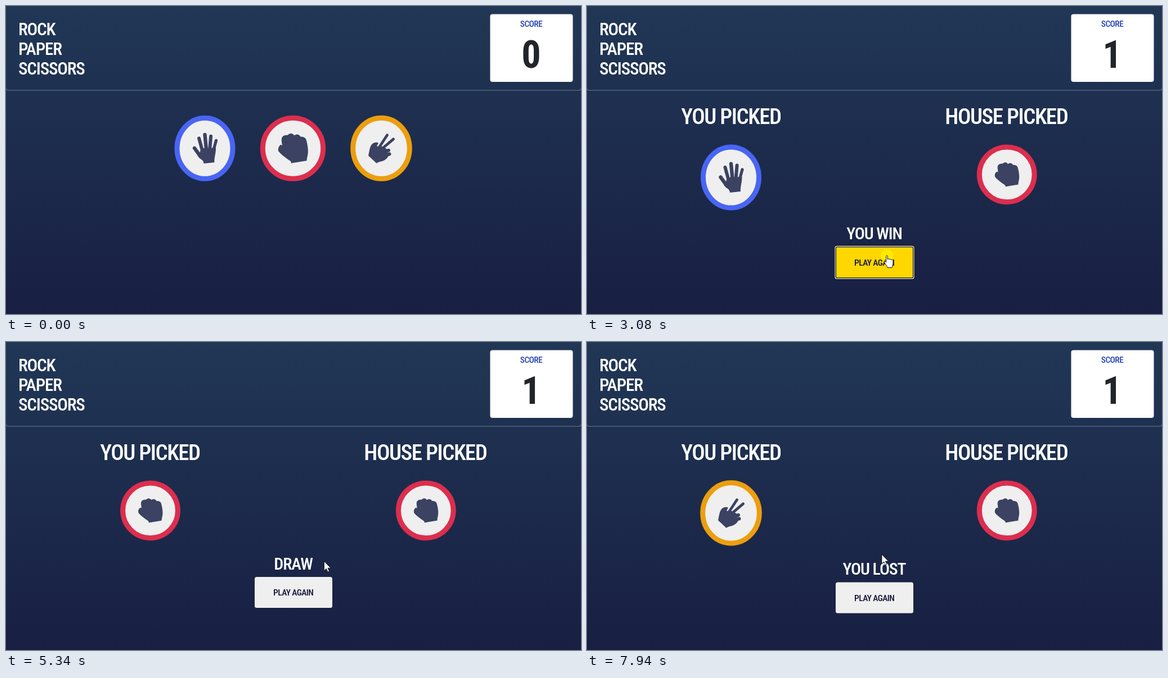
Recreate the animation shown at these times as an HTML page. Size 1022 px wide and 548 px high, loop 8000 ms.

```html
<!DOCTYPE html>
<html lang="en">
<head>
<meta charset="utf-8">
<title>Rock Paper Scissors</title>
<style>
  html, body { margin: 0; width: 100%; height: 100%; overflow: hidden; background: #1d2b4c; }
  svg { display: block; width: 100vw; height: 100vh; }
  text { font-family: "Roboto Condensed", Roboto, "Liberation Sans Narrow", sans-serif; font-stretch: 85%; font-weight: 500; letter-spacing: -.038em; fill: #fff; }
  .mid { text-anchor: middle; }
  .title { font-size: 31px; }
  .pick { font-size: 39px; }
  .result { font-size: 30px; }
  .label { font-size: 15.5px; fill: #2a46b4; }
  .score { font-size: 68px; font-weight: 700; letter-spacing: 0; fill: #212529; }
  .again { font-size: 15.5px; fill: #141539; }
  .face { fill: #efefef; }
  .hot .face { fill: #ffd700; }
  .ring { fill: none; visibility: hidden; }
  .focus .ring { visibility: visible; }
  .hand { fill: #3b4262; }
  .digit { fill: none; stroke: #3b4262; stroke-linecap: round; }
</style>
</head>
<body>
<svg viewBox="0 0 1022 548" preserveAspectRatio="none">
  <defs>
    <linearGradient id="bg" x2="0" y2="1">
      <stop stop-color="#213756"/><stop offset="1" stop-color="#181f42"/>
    </linearGradient>

    <g id="paper">
      <g class="digit">
        <path stroke-width="6.4" d="M-18.5-.5L-8 14M0-24.3L2.5 2"/>
        <path stroke-width="6" d="M-10.5-18L-4.5 4M10.6-21.5L8.5 4"/>
        <path stroke-width="5.2" d="M20-14L14 8"/>
      </g>
      <path class="hand" d="M-13 13C-9 20-2 20-2 27L17 25C16 17 20 8 19.5-1L-7 0-9 8Z"/>
    </g>

    <path id="rock" class="hand" d="M45.06 12.22c-.642-8.096-9.734-7.269-9.734-7.269-3.837-6.765-9.832-1.865-9.832-1.865-4.606-6.63-10.38-.486-10.38-.486-9.957-1.074-9.571 7.066-9.571 7.066-.234 2.588 1.403 10.593 1.403 10.593-1.477-4.614-4.68-.784-4.68-.784-3.94 6.078-.975 9.405-.975 9.405 5.33 6.246 16.688 13.743 16.688 13.743 4.113 2.356 2.373 4.457 2.373 4.457l24.876-4.11.571-4.718c3.782-11.436-.739-26.032-.739-26.032z"/>

    <g id="scissors">
      <g class="digit">
        <path stroke-width="4.8" d="M10.5-23.5L-3-3M21.5-16.5L1 1"/>
        <path stroke-width="6" d="M13 3.5L4 8M14.5 10L5 13"/>
      </g>
      <path class="hand" d="M-8.5 26.5L-23 13C-21 5-21-3-16-8C-12-11.5-7-11-5-9.5L-8-4-3-3 0-4 4-2 10 1 9 8 13 12C12 18 4 23-1 23.5C-4 24-6 25-8.5 26.5Z"/>
    </g>

    <path id="arrow" d="M0 0V16.5L3.8 13 6.5 18.8 9 17.7 6.4 12H11.5Z" fill="#fff" stroke="#111" stroke-width=".8"/>
    <path id="pointer" d="M-1.3 1.3C-1.3-.5 1.3-.5 1.3 1.3V7C2 5.500 3.800 5.500 4.200 6.700 5.500 5.700 7 6.300 7.400 7.600 9 6.900 11 7.800 11 9.500V14C11 17 9.300 18 9.300 21.500H1C1 19-3.500 14.500-4.800 11.800-4.500 10-2.800 10.300-1.300 12Z" fill="#fff" stroke="#111"/>
  </defs>

  <rect width="1022" height="548" fill="url(#bg)"/>
  <path d="M.5 147Q.5 150 3.5 150H1018.5Q1021.5 150 1021.5 147" fill="none" stroke="#fff" stroke-opacity=".36"/>
  <text class="title" x="22" y="52">ROCK</text>
  <text class="title" x="22" y="87">PAPER</text>
  <text class="title" x="22" y="122">SCISSORS</text>
  <rect x="860.5" y="14.5" width="147" height="120.5" rx="4" fill="#fff"/>
  <text class="label mid" x="933.5" y="37">SCORE</text>
  <text class="score mid" id="score" x="933.5" y="109.5">0</text>

  <g id="choose"></g>

  <g id="outcome">
    <text class="pick mid" x="256" y="210">YOU PICKED</text>
    <text class="pick mid" x="745.3" y="210">HOUSE PICKED</text>
    <g id="mine"></g>
    <g id="house"></g>
    <g id="footer">
      <text class="result mid" id="result" x="510.5" y="414.3"></text>
      <g id="again">
        <rect class="face" x="442" y="427.5" width="138" height="55" rx="3.5"/>
        <text class="again mid" x="510.7" y="460.5">PLAY AGAIN</text>
      </g>
    </g>
  </g>

  <circle id="click" r="11" fill="#ff0" fill-opacity=".5"/>
  <g id="cursor"><use id="plain" href="#arrow"/><use id="finger" href="#pointer"/></g>
</svg>

<script>
const $ = id => document.getElementById(id);
const show = (el, on) => el.style.display = on ? '' : 'none';

const kinds = {
  paper: { x: 353.5, rx: 54, color: '#4865f4' },
  rock: { x: 510, rx: 58.2, color: '#dc2e4e' },
  scissors: { x: 667, rx: 54.8, color: '#ec9e0e' }
};

// White outline with a dark band inside it
function ring(x, y, w, h) {
  const box = `x="${x}" y="${y}" width="${w}" height="${h}" rx="3"`;
  return `<g class="ring"><rect ${box} stroke="#10131f" stroke-width="4"/>
    <rect ${box} stroke="#fff" stroke-width="1.2"/></g>`;
}

function badge(name, x, y, rx, ry) {
  const size = 2 * rx - 63.5;
  const place = name === 'rock'
    ? `translate(${x - size / 2} ${y - size / 2}) scale(${size / 47})`
    : `translate(${x} ${y})`;
  return `<ellipse class="face" cx="${x}" cy="${y}" rx="${rx - 4.5}" ry="${ry - 4.5}"
      stroke="${kinds[name].color}" stroke-width="9"/>
    <use href="#${name}" transform="${place}"/>
    ${ring(x - rx - .2, y - ry - .4, 2 * rx + .4, 2 * ry + .8)}`;
}

$('choose').innerHTML = Object.entries(kinds).map(([name, k]) =>
  `<g id="btn-${name}">${badge(name, k.x, 253.3, k.rx, 58.5)}</g>`).join('');
$('house').innerHTML = badge('rock', 746.3, 299.8, 53.4, 53.4);
$('again').insertAdjacentHTML('beforeend', ring(441, 426.3, 140, 57.9));

const rounds = {
  paper: { text: 'YOU WIN', shift: 1, badge: badge('paper', 256, 305, 54, 58.5) },
  rock: { text: 'DRAW', shift: -9.5, badge: badge('rock', 256.5, 299.8, 53.4, 53.4) },
  scissors: { text: 'YOU LOST', shift: 0, badge: badge('scissors', 256, 304.3, 54.8, 58.2) }
};

// [start, screen]
const screens = [[0, ''], [1370, 'paper'], [3150, ''], [4110, 'rock'], [5890, ''], [6990, 'scissors']];
// [pressed, released]
const clicks = [[1300, 1370], [3080, 3150], [4040, 4110], [5820, 5960], [6920, 6990]];
// [start, end, waypoints]
const moves = [
  [130, 970, [[895, 511], [740, 420], [520, 318], [385, 268], [356, 261]]],
  [1700, 2730, [[356, 261], [480, 257], [620, 280], [657, 335], [615, 382], [533, 444]]],
  [3350, 3910, [[533, 444], [526, 380], [513, 290], [508, 247]]],
  [4570, 5620, [[508, 247], [545, 241], [592, 280], [597, 340], [565, 391], [531, 440]]],
  [5960, 6790, [[531, 440], [590, 397], [630, 345], [662, 285], [680, 257]]],
  [7450, 7940, [[680, 257], [640, 283], [570, 335], [524, 378]]]
];

function spline(pts, u) {
  const n = pts.length - 1, i = Math.min(n - 1, Math.floor(u * n)), f = u * n - i;
  const at = j => pts[Math.max(0, Math.min(n, j))];
  return [0, 1].map(c => {
    const [a, b, d, e] = [at(i - 1)[c], at(i)[c], at(i + 1)[c], at(i + 2)[c]];
    return b + f * (d - a + f * (2 * a - 5 * b + 4 * d - e + f * (3 * (b - d) + e - a))) / 2;
  });
}

function cursorAt(t) {
  const [start, end, pts] = moves.filter(m => m[0] <= t).pop() || moves[0];
  const tick = Math.floor((t - start) / 70 + 1) * 70;
  const u = Math.max(0, Math.min(1, tick / (end - start + 70)));
  return spline(pts, u * (.5 + u * (1.5 - u)));
}

function hoverAt(screen, x, y) {
  if (screen) {
    const top = 427.5 + rounds[screen].shift;
    return x > 442 && x < 580 && y > top && y < top + 55 ? 'again' : '';
  }
  const hit = Object.keys(kinds).find(n =>
    Math.hypot((x - kinds[n].x) / kinds[n].rx, (y - 253.3) / 58.5) < 1);
  return hit ? 'btn-' + hit : '';
}

let last = null;
function setScreen(name) {
  if (name === last) return;
  last = name;
  show($('choose'), !name);
  show($('outcome'), name);
  if (!name) return;
  const r = rounds[name];
  $('mine').innerHTML = r.badge;
  $('result').textContent = r.text;
  $('footer').setAttribute('transform', `translate(0 ${r.shift})`);
}

function draw() {
  const t = performance.now() % 8000;
  const screen = screens.filter(s => s[0] <= t).pop()[1];
  const [x, y] = cursorAt(t);
  const visible = t >= 130;
  const hover = visible ? hoverAt(screen, x, y) : '';
  const pressed = clicks.some(c => t >= c[0] && t < c[1]);

  setScreen(screen);
  $('score').textContent = t < 1370 ? 0 : 1;
  for (const id of ['btn-paper', 'btn-rock', 'btn-scissors', 'again']) {
    $(id).classList.toggle('hot', id === hover);
    $(id).classList.toggle('focus', id === hover && pressed);
  }
  show($('cursor'), visible);
  show($('plain'), !hover);
  show($('finger'), hover);
  $('cursor').setAttribute('transform', `translate(${x} ${y})`);
  show($('click'), pressed);
  $('click').setAttribute('transform', `translate(${x} ${y})`);
  requestAnimationFrame(draw);
}
draw();
</script>
</body>
</html>
```
